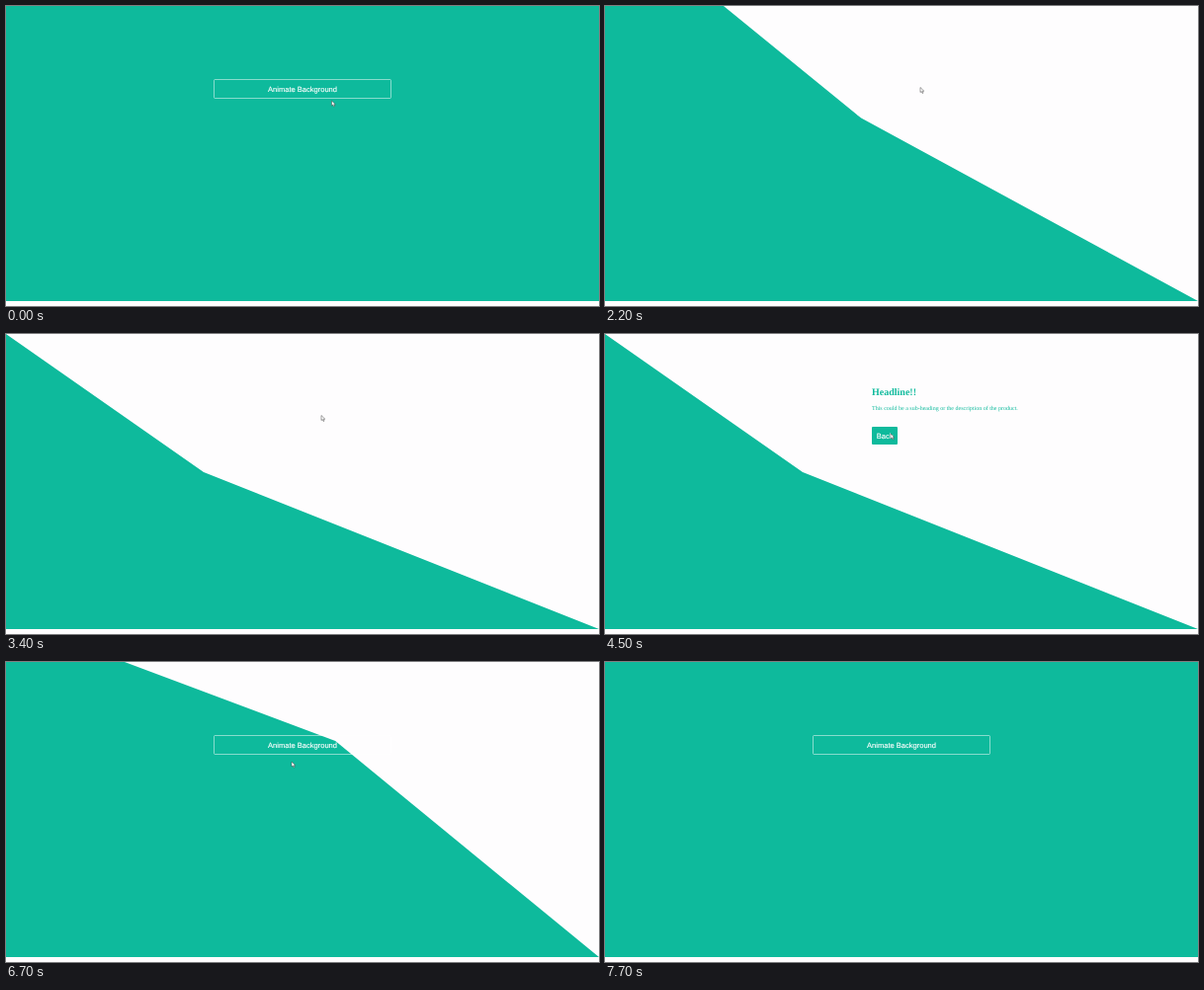
These frames come from a looping animation (600x304 px, 8.8 s). An HTML page:

```html
<!DOCTYPE html>
<html lang="en">
<head>
<meta charset="utf-8">
<title>Animate Background</title>
<style>
  html, body { margin: 0; width: 100%; height: 100%; overflow: hidden; background: #fefdfe; }
  svg { display: block; width: 600px; height: 304px; }
  text { text-rendering: geometricPrecision; }
  .sans { font: 7.54px "Liberation Sans", Arial, sans-serif; fill: #fff; stroke: #fff; stroke-width: .15; }
  .serif { font-family: "Liberation Serif", "Times New Roman", serif; }
  .teal { fill: #0eba9c; }
</style>
</head>
<body>
<svg viewBox="0 0 600 304">
  <polygon id="shape" class="teal"/>
  <g id="start">
    <rect x="210.5" y="74.5" width="179" height="19" rx="1" fill="none" stroke="#fff" stroke-opacity=".5"/>
    <text class="sans" x="300" y="86.8" text-anchor="middle">Animate Background</text>
  </g>
  <g id="panel">
    <text class="serif teal" x="270" y="62.3" font-size="10" font-weight="bold">Headline!!</text>
    <text class="serif teal" x="270" y="77" font-size="6">This could be a sub-heading or the description of the product.</text>
    <rect class="teal" x="270" y="94" width="26" height="18" rx="1"/>
    <text class="sans" x="283.2" y="105.7" text-anchor="middle">Back</text>
  </g>
  <path id="cursor" d="M0 0V5L1.2 4L2.1 6L3 5.6L2.2 3.7H3.8Z" fill="#fff" stroke="#444" stroke-width=".5"/>
</svg>
<script>
const LOOP = 8800, STEP = 100;
const $ = id => document.getElementById(id);

// Progress from 0 to 1 between two times
const ramp = (t, from, to) => Math.min(1, Math.max(0, (t - from) / (to - from)));
const easeOut = p => 1 - (1 - p) ** 2;
const mix = (a, b, p) => a.map((v, i) => v + (b[i] - v) * p);

// Top corner x, then the bend's x and y
const full = [120, 600, 0], opening = [120, 240, 120];
const split = [0, 200, 140], closing = [120, 300, 90];

function outline(t) {
  const stage = (a, b, from, to) => mix(a, b, easeOut(ramp(t, from, to)));
  if (t < 2440) return stage(full, opening, 1400, 2440);
  if (t < 5800) return stage(opening, split, 2440, 3360);
  if (t < 6650) return stage(split, closing, 5800, 6650);
  return stage(closing, full, 6650, 7527);
}

// The pointer rests on each button, swings around the panel, then leaves right
function pointer(t) {
  const rest = [329.5, 96], button = [319, 82.5], back = [289, 101], exit = [546, 101];
  if (t < 3900) return mix(rest, button, ramp(t, 0, 600));
  const p = ramp(t, 3900, 4500);
  const [x, y] = mix(mix(button, back, p), exit, ramp(t, 7100, 7600));
  return [x + 85 * Math.sin(2 * Math.PI * p), y + 112 * Math.sin(Math.PI * p)];
}

function show(id, on) {
  $(id).style.display = on ? "" : "none";
}

function draw(now) {
  const t = Math.floor(now % LOOP / STEP) * STEP;
  const [top, x, y] = outline(t);
  $("shape").setAttribute("points", `0,0 ${top},0 ${x},${y} 600,299 0,299`);
  $("cursor").setAttribute("transform", `translate(${pointer(t)})`);
  show("start", t < 1500 || t >= 5900);
  show("panel", t >= 3500 && t < 5900);
  show("cursor", t < 7700);
}

let begin;
function tick(now) {
  begin ??= now;
  draw(now - begin);
  requestAnimationFrame(tick);
}
draw(0);
requestAnimationFrame(tick);
</script>
</body>
</html>
```
